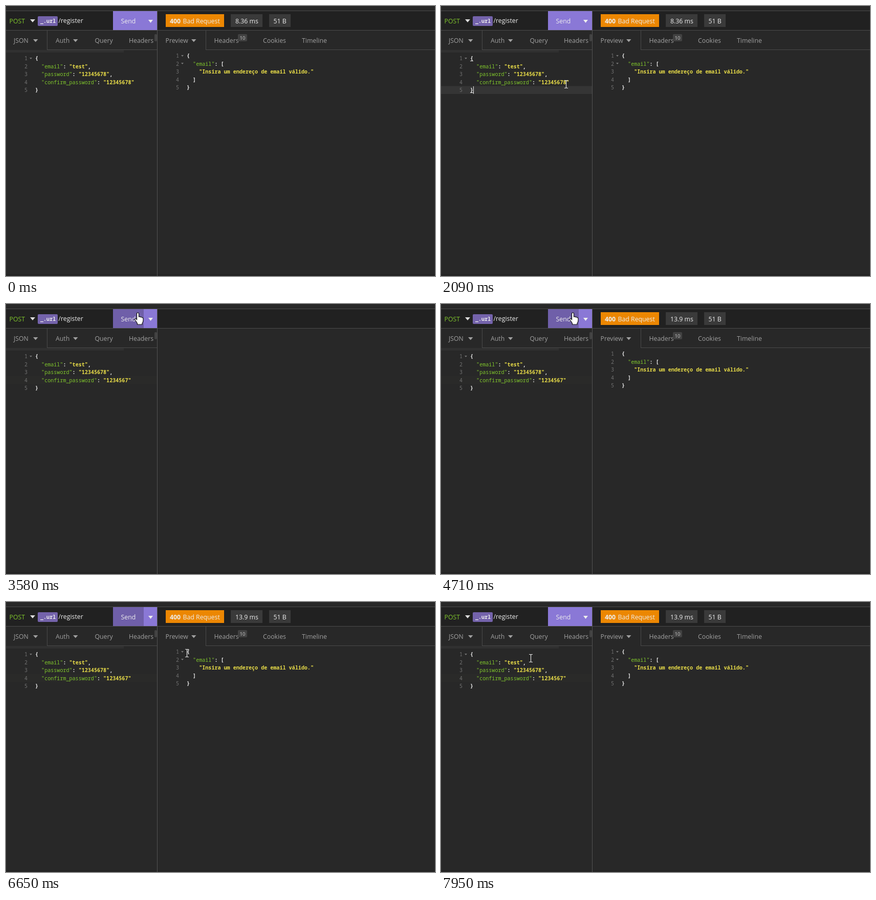
Write an HTML page that moves like this. It is 838 by 528 pixels and loops after 8000 ms.

```html
<!DOCTYPE html>
<html lang="pt">
<head>
<meta charset="utf-8">
<title>Register request</title>
<style>
html, body { margin: 0; width: 100%; height: 100%; overflow: hidden; background: #282828; }
svg { display: block; width: 838px; height: 528px; }
text { font: 12.3px "Open Sans", "Noto Sans", sans-serif; fill: #eee; white-space: pre; }
.tab { fill: #a0a0a0; }
.code text, text.code { font: 600 10.08px "Noto Sans Mono", "DejaVu Sans Mono", monospace; }
.code .num { fill: #717171; font-weight: 400; text-anchor: end; }
.key { fill: #7fc52c; font-weight: 500; }
.str { fill: #e8dc48; font-weight: 700; }
.line { fill: #4a4a4a; }
.tag { fill: #3a3a3a; }
</style>
</head>
<body>
<svg viewBox="0 0 838 528">
  <rect width="838" height="528" fill="#282828"/>
  <rect y="10" width="838" height="37" fill="#212121"/>
  <rect y="524" width="838" height="4" fill="#242424"/>
  <rect y="86" width="230" height="5" fill="#303030"/>
  <g class="line">
    <rect y="9" width="838" height="1"/>
    <rect y="47" width="838" height="1"/>
    <rect x="80" y="48" width="1" height="38"/>
    <rect x="80" y="85" width="215" height="1"/>
  </g>

  <text x="6.5" y="34" style="fill:#7fc52c">POST</text>
  <path d="M47 26h10l-5 6z" fill="#ddd"/>
  <rect x="62" y="20" width="39" height="19" rx="2" fill="#7463ab"/>
  <text class="code" x="67" y="33">_.url</text>
  <text x="102.5" y="33">/register</text>
  <rect x="209" y="10" width="86" height="37" fill="#8a78d6"/>
  <rect id="send" x="209" y="10" width="60" height="37"/>
  <text x="224.5" y="34">Send</text>
  <path d="M278 27h9l-4.500 6z" fill="#eee"/>
  <g id="leftTabs"></g>
  <rect x="290" y="55" width="5" height="14" rx="2" fill="#424242"/>

  <rect id="activeLine" width="295" height="15.500"/>
  <g id="request" class="code"></g>
  <g id="brackets" fill="#ddd">
    <rect x="57" y="107" width="6" height="1"/>
    <rect x="57" y="169" width="6" height="1"/>
  </g>
  <rect id="caret" width="1" height="15" fill="#eee"/>

  <g id="response">
    <g class="line">
      <rect x="390" y="48" width="1" height="38"/>
      <rect x="390" y="85" width="448" height="1"/>
    </g>
    <rect x="312" y="16" width="114" height="25" fill="#ec8702"/>
    <text x="320" y="34" font-weight="700" style="font-weight:700">400</text>
    <text x="345.500" y="34" style="font-weight:500">Bad Request</text>
    <rect class="tag" x="439" y="16" width="62" height="25"/>
    <text id="elapsed" x="448" y="34"></text>
    <rect class="tag" x="514" y="16" width="42" height="25"/>
    <text x="522.500" y="34">51 B</text>
    <g id="rightTabs"></g>
    <rect x="453" y="55" width="18" height="14" rx="2" fill="#424242"/>
    <text x="456.500" y="66" style="font-size:9.500px;fill:#ccc">10</text>
    <path id="selection" d="M353 90H838V152H359V167H353z" fill="#515151"/>
    <g id="result" class="code"></g>
    <path id="folds" d="M342 96h5l-2.500 3zM342 111h5l-2.500 3z" fill="#777"/>
  </g>
  <path d="M46 101h5l-2.500 3z" fill="#777"/>
  <rect class="line" x="295" y="10" width="1" height="518" style="fill:#525252"/>

  <path id="beam" d="M-3.500 -7.500H-1L0 -6.500L1 -7.500H3.500M0 -6.500V6.500M-3.500 7.500H-1L0 6.500L1 7.500H3.500"
    fill="none" stroke="#e4e4e4" stroke-width="1.200"/>
  <path id="hand" d="M-2.500 2Q-2.500 0-.5 0Q1.500 0 1.500 2V8Q3.800 7 4.800 8.700Q7 8 7.800 9.600Q10 9.200 10 11.500V15Q10 18 8 20.500V23H-1.500V21Q-3 18-6 14Q-7 11.500-4.500 11.500L-2.500 13.500Z"
    fill="#fff" stroke="#111" stroke-width="1.200"/>
</svg>

<script>
const LOOP = 8000;
const $ = id => document.getElementById(id);

// Wraps quoted keys and values in coloured spans.
const paint = line => line.replace(/"[^"]*"(:?)/g, (all, colon) => colon
  ? `<tspan class="key">${all.slice(0, -1)}</tspan>:`
  : `<tspan class="str">${all}</tspan>`);

function drawCode(id, x, numX, baseline, lines) {
  $(id).innerHTML = lines.map((line, i) => {
    const indent = line.length - line.trimStart().length;
    const y = baseline + i * 15.5;
    return `<text class="num" x="${numX}" y="${y}">${i + 1}</text>` +
      `<text x="${x + indent * 6.05}" y="${y}">${paint(line.trim())}</text>`;
  }).join("");
}

function drawTabs(id, tabs) {
  $(id).innerHTML = tabs.map(([x, label, arrowX]) =>
    `<text class="tab" x="${x}" y="72">${label}</text>` +
    (arrowX ? `<path d="M${arrowX} 65h9.500l-4.750 5.500z" fill="#a0a0a0"/>` : "")).join("");
}

drawTabs("leftTabs", [[15, "JSON", 53], [97, "Auth", 131], [173.5, "Query"], [240, "Headers"]]);
drawTabs("rightTabs", [[311.5, "Preview", 362], [406.5, "Headers"], [502, "Cookies"], [578, "Timeline"]]);
drawCode("request", 57, 42, 106, [
  '{', '  "email": "test",', '  "password": "12345678",', '  "confirm_password": "12345678"', '}']);
drawCode("result", 353, 338, 101, [
  '{', '  "email": [', '    "Insira um endereço de email válido."', '  ]', '}']);
const confirmValue = $("request").querySelectorAll(".str")[2];

// Pointer stops: time, x, y
const pointer = [
  [0, 568, 462], [70, 566, 460], [850, 249, 131], [1250, 241, 140], [1650, 240, 161],
  [1800, 240, 161], [2050, 244, 153], [2540, 244, 153], [3060, 258, 18], [5000, 258, 18],
  [5400, 400, 134], [5780, 537, 135], [6000, 402, 133], [6250, 385, 133], [6600, 353, 98],
  [6660, 353, 100], [6720, 393, 156], [6790, 457, 212], [7320, 457, 212], [7950, 175, 110],
  [LOOP, 175, 110]
];
const ease = p => p * p * (3 - 2 * p);

function pointerAt(t) {
  const i = Math.max(1, pointer.findIndex(stop => stop[0] > t));
  const [t0, x0, y0] = pointer[i - 1], [t1, x1, y1] = pointer[i];
  const p = ease((t - t0) / (t1 - t0));
  return [Math.round(x0 + (x1 - x0) * p), Math.round(y0 + (y1 - y0) * p)];
}

const show = (id, on) => $(id).setAttribute("visibility", on ? "visible" : "hidden");
const set = (id, attrs) => Object.entries(attrs).forEach(([k, v]) => $(id).setAttribute(k, v));

function render(t) {
  const [x, y] = pointerAt(t);
  const overButtons = y < 86;
  set("beam", { transform: `translate(${x + .5} ${y})` });
  set("hand", { transform: `translate(${x} ${y - 1})` });
  show("beam", t >= 70 && !overButtons);
  show("hand", overButtons);

  const erased = t >= 2450;
  const lastLine = t < 2230;
  confirmValue.textContent = erased ? '"1234567"' : '"12345678"';
  show("activeLine", t >= 1750);
  set("activeLine", {
    y: lastLine ? 156.5 : 141,
    fill: t >= 3440 ? "#2a2a29" : lastLine ? "#353535" : "#323230"
  });
  show("brackets", t >= 1750 && lastLine);
  show("caret", t >= 1750 && t < 3440);
  set("caret", { x: lastLine ? 63 : erased ? 238 : 244, y: lastLine ? 157 : 141 });

  set("send", {
    fill: t < 2940 || t >= 6720 ? "#8a78d6" : t < 3440 ? "#7c6aba" : "#6f5fa9"
  });
  $("response").style.display = t >= 3510 && t < 4710 ? "none" : "";
  $("elapsed").textContent = t < 3510 ? "8.36 ms" : "13.9 ms";
  show("folds", t < 3510 || t >= 5040);
  show("selection", t >= 6720 && t < 7320);
}

const start = performance.now();
function tick() {
  render((performance.now() - start) % LOOP);
  requestAnimationFrame(tick);
}
tick();
</script>
</body>
</html>
```
